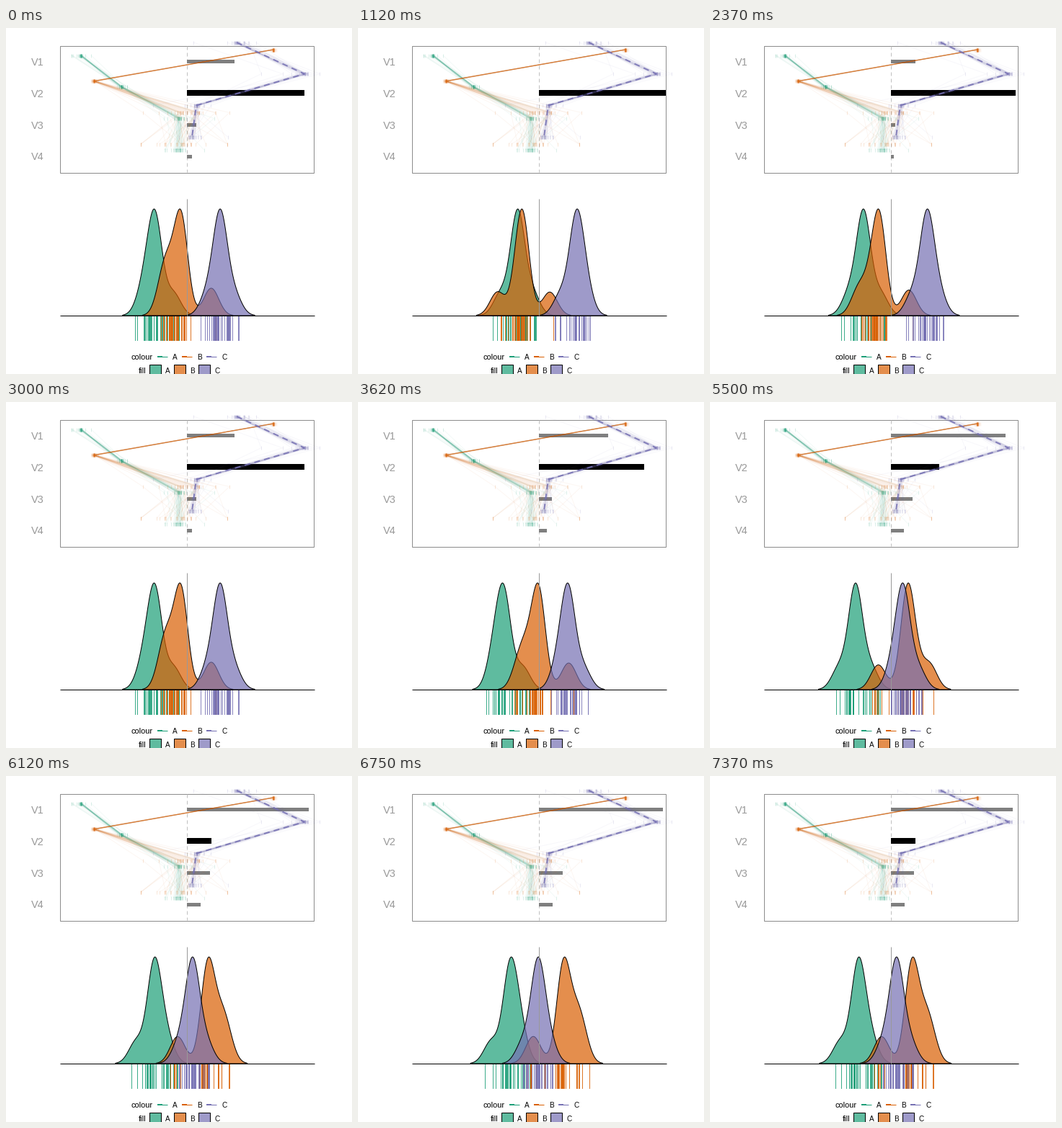
A matplotlib script that plays this animation: 480 by 480 pixels, repeating every 8000 ms.

```python
import numpy as np
import matplotlib.pyplot as plt
from matplotlib.animation import FuncAnimation
from matplotlib.collections import LineCollection
from matplotlib.colors import to_rgba
from matplotlib.patches import Polygon, Rectangle

DPI, SIZE = 100, 480
LOOP, INTERVAL = 8000, 50
PX = 72 / DPI                      # one pixel in points
MID, HALF = 251, 176               # centre and half width of both panels
BASE, PEAK = 399, 148              # density baseline and height
COLORS = {"A": "#1b9e77", "B": "#d95f02", "C": "#7570b3"}

HOLD, TURNS = 625, 8               # ms per step, steps per quarter turn
END_AXIS = np.array([0.977, 0, 0.1875, 0.108])

# Each group is a core cloud with three satellites on a ring around it
CLOUDS = {
    "A": dict(centre=(-30, -41), radius=25, phase=35),
    "B": dict(centre=(-23, 34), radius=42, phase=25),
    "C": dict(centre=(51, -2), radius=21, phase=50),
}
SHARE, SPREAD, COUNT = 0.16, 9.5, 34   # satellite weight, cloud width, points

# Row height of the first variable, mean x per row, spread of upper and lower rows
PROFILES = {
    "A": dict(top=38, means=(104, 160, 241, 239), tight=1.5, loose=4),
    "B": dict(top=30, means=(371, 122, 250, 247), tight=1.2, loose=13),
    "C": dict(top=20, means=(320, 414, 264, 258), tight=3, loose=2.5),
}

rng = np.random.default_rng(7)

fig = plt.figure(figsize=(SIZE / DPI, SIZE / DPI), dpi=DPI, facecolor="white")
ax = fig.add_axes([0, 0, 1, 1])
ax.set(xlim=(0, SIZE), ylim=(SIZE, 0))
ax.axis("off")


def line(x, y, color, width=1, **kw):
    kw.setdefault("solid_capstyle", "butt")
    return ax.plot(x, y, color=color, lw=width * PX, **kw)[0]


def label(x, y, text, px, color="black"):
    ax.text(x, y, text, fontsize=px * PX, color=color, va="baseline",
            family="Liberation Sans")


def box(x, y, w, h, **kw):
    return ax.add_patch(Rectangle((x, y), w, h, **kw))


def segments(lines, color, alpha, **kw):
    group = LineCollection(lines, colors=[to_rgba(color, alpha)],
                           linewidths=PX, **kw)
    return ax.add_collection(group)


def draw_profile(name, top, means, tight, loose):
    rows = top + 43.7 * np.arange(4)
    spread = np.repeat([tight, loose], 2)
    stray = rng.standard_t(1.5, (COUNT, 4)) * spread
    xs = means + np.clip(stray, -60, 60)
    segments([np.column_stack([x, rows]) for x in xs],
             COLORS[name], 0.05, zorder=5)
    marks = [[(x, y - 2.5), (x, y + 2.5)]
             for row in xs for x, y in zip(row, rows)]
    segments(marks, COLORS[name], 0.15, zorder=5)
    if name == "C":
        line(means, rows, COLORS[name], 2, alpha=0.85, zorder=5,
             dashes=(4, 3), dash_capstyle="butt")


def draw_legend():
    label(173, 460, "colour", 11)
    label(184, 479, "fill", 11)
    for i, (name, color) in enumerate(COLORS.items()):
        x = 210 + 34 * i
        line([x, x + 7], [456, 456], color, 2)
        line([x, x + 14], [456, 456], color, 1)
        label(x + 21, 460, name, 10)
        box(x - 11, 467, 16, 16, fc=to_rgba(color, 0.7), ec="black", lw=PX)
        label(x + 11, 479, name, 10)


# Upper panel
box(75, 25, 352, 176, fc="none", ec="#8c8c8c", lw=PX, zorder=1)
line([MID, MID], [25, 200], "#bebebe", 1, dashes=(5, 4), zorder=1)
bars = []
for i in range(4):
    label(35, 52 + 43.8 * i, f"V{i + 1}", 14.5, "#999999")
    h, color = (8, "black") if i == 1 else (5, "#7f7f7f")
    bars.append(box(MID, round(46.5 + 43.9 * i - h / 2), 0, h,
                    fc=color, lw=0, zorder=4))
for name, profile in PROFILES.items():
    draw_profile(name, **profile)


# Lower panel
def ring(centre, radius, phase):
    angles = np.radians(phase + 120 * np.arange(3))
    offsets = radius * np.column_stack([np.cos(angles), np.sin(angles)])
    return np.array(centre) + np.vstack([[0, 0], offsets])


WEIGHTS = np.array([1 - 3 * SHARE, SHARE, SHARE, SHARE])
WIDTHS = SPREAD * np.array([1, 1.1, 1.1, 1.1])
GRID = np.linspace(MID - HALF, MID + HALF, 500)

rugs, hills, clouds, points = {}, {}, {}, {}
for name, color in COLORS.items():
    clouds[name] = ring(**CLOUDS[name])
    pick = rng.choice(4, COUNT, p=WEIGHTS)
    points[name] = clouds[name][pick] + rng.normal(0, 7, (COUNT, 2))
    rugs[name] = segments([], color, 0.85, antialiaseds=False, zorder=2)
    hills[name] = ax.add_patch(Polygon(
        [(0, 0), (1, 0), (1, 1)], fc=to_rgba(color, 0.7), ec="black",
        lw=PX, zorder=3))
line([75, 428], [BASE, BASE], "black", zorder=4)
line([MID, MID], [237, BASE], "#999999", zorder=4)
draw_legend()


def hill(cloud, direction):
    z = (GRID[:, None] - MID - cloud @ direction) / WIDTHS
    height = np.exp(-z * z / 2) @ (WEIGHTS / WIDTHS)
    height /= height.max()
    keep = height > 0.004
    x, y = GRID[keep], BASE - PEAK * height[keep]
    return np.column_stack([np.r_[x[0], x, x[-1]], np.r_[BASE, y, BASE]])


def draw(frame):
    # Turn back to V2, rest one step, then swing to the end axis and return
    now = frame * INTERVAL + INTERVAL - 1
    tick = (now + 125) // HOLD
    step = max(2 - tick, tick - 3)
    angle = min(step, 2 * TURNS - step) * np.pi / 2 / TURNS
    direction = np.array([np.cos(angle), np.sin(angle)])

    loads = END_AXIS * direction[1]
    loads[1] = direction[0]
    for bar, load in zip(bars, loads):
        bar.set_width(round(HALF * load))

    for name in COLORS:
        hills[name].set_xy(hill(clouds[name], direction))
        xs = np.floor(MID + points[name] @ direction)
        rugs[name].set_segments([[(x, 399), (x, 433)] for x in xs])
    return [*bars, *hills.values(), *rugs.values()]


anim = FuncAnimation(fig, draw, frames=LOOP // INTERVAL, interval=INTERVAL,
                     init_func=lambda: draw(0), repeat=True, repeat_delay=0)
plt.show()
```
